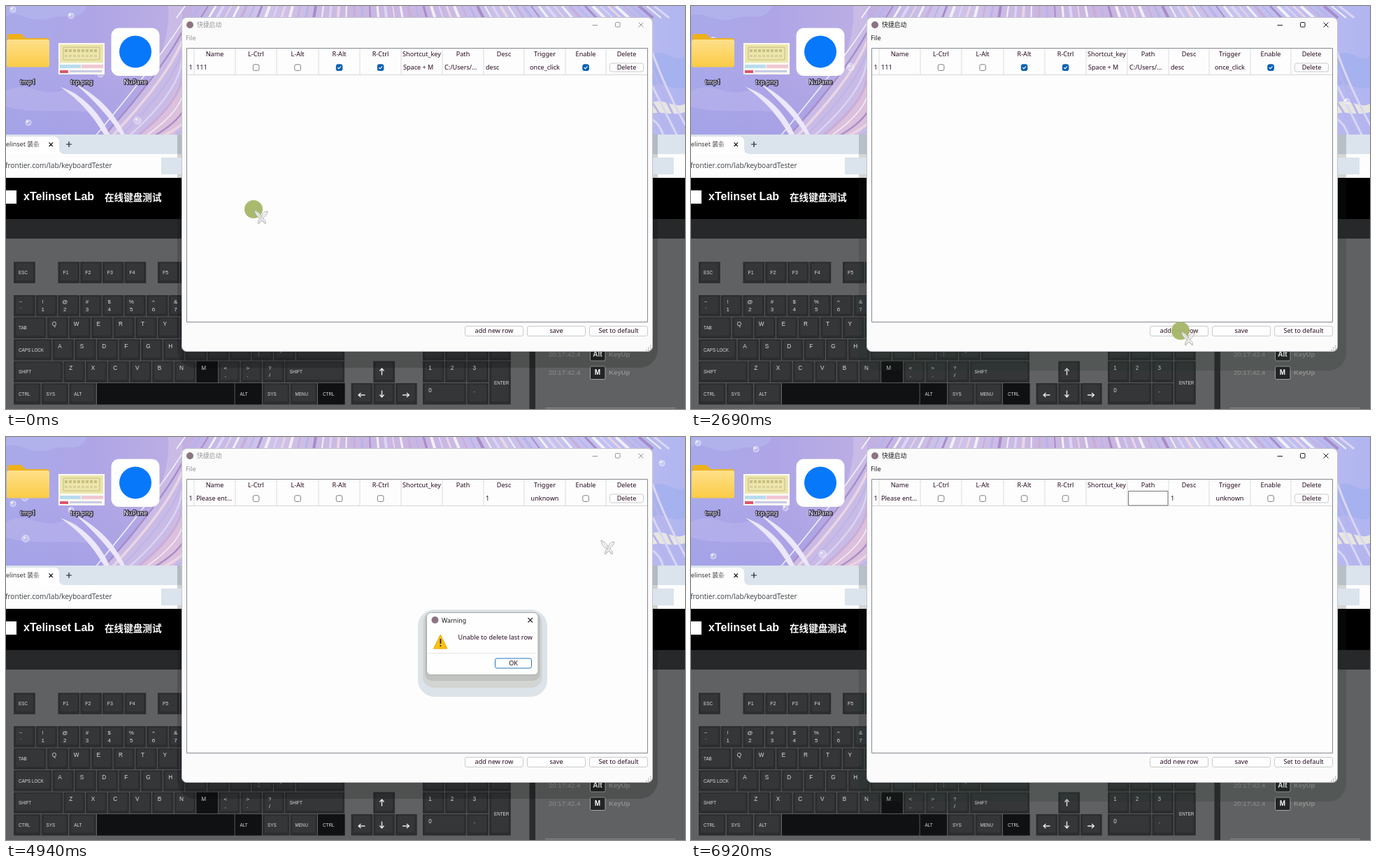
An HTML page with a canvas for the animation above (7.01 s loop, 971x577 px).

```html
<!DOCTYPE html>
<html lang="zh">
<head>
<meta charset="utf-8">
<title>快捷启动</title>
<style>
html, body { margin: 0; width: 100%; height: 100%; overflow: hidden; background: #5f6061; }
canvas { display: block; }
</style>
</head>
<body>
<canvas id="stage" width="971" height="577"></canvas>
<script>
const c = document.getElementById('stage').getContext('2d');
const LOOP = 7010, STEP = LOOP / 78;
const UI = '"Noto Sans", "Noto Sans CJK SC", "Noto Sans CJK", sans-serif';
const ARIAL = '"Liberation Sans", "Noto Sans CJK SC", "Noto Sans CJK", sans-serif';
const INK = '#260a20';

// drawing helpers
function rect(x, y, w, h, fill) { c.fillStyle = fill; c.fillRect(x, y, w, h); }

function box(x, y, w, h, r, fill, stroke, line = 1) {
  c.beginPath();
  c.roundRect(x, y, w, h, r);
  if (fill) { c.fillStyle = fill; c.fill(); }
  if (stroke) { c.strokeStyle = stroke; c.lineWidth = line; c.stroke(); }
}

function disc(x, y, r, fill) {
  c.beginPath();
  c.arc(x, y, r, 0, 7);
  c.fillStyle = fill;
  c.fill();
}

function path(d, fill, stroke, line = 1) {
  const p = new Path2D(d);
  if (fill) { c.fillStyle = fill; c.fill(p); }
  if (stroke) { c.strokeStyle = stroke; c.lineWidth = line; c.stroke(p); }
}

function text(s, x, y, size = 9.1, color = INK, align = 'left', font = UI, weight = '') {
  c.font = `${weight} ${size}px ${font}`;
  c.textAlign = align;
  c.textBaseline = 'middle';
  c.fillStyle = color;
  c.fillText(s, x, y);
}

function gradient(x0, y0, x1, y1, ...colors) {
  const g = c.createLinearGradient(x0, y0, x1, y1);
  colors.forEach((color, i) => g.addColorStop(i / (colors.length - 1), color));
  return g;
}

// desktop
const HAIR = ['#f3effb', '#a78cc8', '#ead5e4', '#b9b3ea', '#dcd5f4', '#c7aeda'];

function wallpaper(t) {
  rect(0, 0, 971, 184, gradient(0, 0, 971, 0, '#a8a9ea', '#afa5e6', '#bcaee4', '#cfc4ea',
    '#cab8e2', '#c9b6e2', '#c9c3ec', '#c1c0f0', '#b0b5f0'));
  rect(0, 90, 252, 94, gradient(0, 90, 0, 184, '#a39fe600', '#a39fe6b0'));

  // soft clouds
  path('M0 14C20 6 34 26 62 18S104 24 116 0H0Z', '#b6b8f0a0');
  path('M0 122C30 106 48 130 76 122S108 136 116 152C80 146 44 156 0 144Z', '#b9b5eea0');
  path('M924 70C944 58 956 84 971 72V116C950 124 940 104 924 116Z', '#9fb0efa0');
  path('M924 138C944 132 956 148 971 140V152C950 158 940 150 924 154Z', '#e6e6e0');

  // hair sweeping down from behind the window
  path('M232 0C236 50 212 120 140 184H252V0Z', '#c9bbe6');
  path('M252 100C238 138 216 162 194 184H240L252 164Z', '#dcc0dc');
  for (let i = 0; i < 11; i++) {
    const x = 128 + i * 12, y = 24 + i * 13;
    path(`M252 ${y}Q${x + 84 - i * 3} ${y + 62 - i * 4} ${x} 186`, null, HAIR[i % 6], 1.5 + i % 3);
  }
  path('M78 116C108 126 134 152 148 184H140C124 156 104 134 78 116ZM100 112C134 130 156 154 170 184H164C146 156 124 134 100 112Z',
    '#ece7f9');
  for (let i = 0; i < 5; i++)
    path(`M924 ${66 + i * 24}Q${944 - i * 2} ${122 + i * 12} ${980 - i * 10} 186`, null, HAIR[i % 2 ? 3 : 4], 3);

  // locks above the window
  for (let i = 0; i < 62; i++) {
    const x = 256 + i * 11, lean = (x - 500) * .05;
    path(`M${x} 0L${x + lean} 17`, null, HAIR[i * 5 % 7 % 6], 2 + i % 3);
  }

  // rising bubbles
  [[10, 5], [28, 55], [135, 98], [188, 164], [32, 167], [228, 206], [938, 255], [27, 304], [93, 14]]
    .forEach(([x, y0], i) => {
      const y = (y0 - t * .044 + 308) % 308;
      if (y > 180) return;
      disc(x, y, 4 + i % 2, '#ffffff40');
      c.strokeStyle = '#ffffff90';
      c.lineWidth = 1;
      c.stroke();
      disc(x - 1.5, y - 1.5, 1.3, '#fff');
    });
}

function label(s, x, y) {
  c.font = `9px ${UI}`;
  c.textAlign = 'center';
  c.textBaseline = 'middle';
  c.lineJoin = 'round';
  c.lineWidth = 2.4;
  c.strokeStyle = '#151020c0';
  c.strokeText(s, x + .5, y + .5);
  text(s, x, y, 9, '#fff', 'center');
}

function icons() {
  path('M2 44Q2 40 6 40H22L28 46H58Q62 46 62 50V60H2Z', '#eeb11d');
  box(1, 48, 61, 39.5, 3, gradient(0, 48, 0, 88, '#ffe08a', '#fbcb45'));

  rect(75, 53, 66, 45, '#fbfaf2');
  rect(77, 55, 62, 26, '#ece6ad');
  box(82, 59, 52, 18, 1, null, '#b5ab70', .7);
  for (let i = 0; i < 8; i++) {
    rect(84 + i * 6, 62, 4, 4, '#c9bf81');
    rect(84 + i * 6, 70, 4, 3, '#d8d097');
  }
  rect(77, 84, 30, 5, '#b9dcef');
  rect(108, 84, 31, 5, '#f1c7d3');
  rect(77, 92, 12, 4, '#e0546c');
  rect(91, 92, 46, 3, '#c8cbe6');

  box(150.5, 31.5, 69, 68.5, 11, '#fff');
  disc(185, 65.5, 23, '#0878fb');

  label('tmp1', 31, 109);
  label('tcp.png', 108, 109);
  label('NuPane', 185, 109);
}

// browser
function key(x, y, w, name = '', dark = false, h = 30.6) {
  rect(x, y, w, h, dark ? '#101112' : '#2b2d2f');
  if (!dark) box(x + 3, y + 2, w - 6, h - 6, 2, '#343638');
  const color = '#dcdcdc';
  if (name.length > 2 || /^F\d/.test(name))
    text(name, x + 7, y + h / 2 + .5, name[0] === 'F' ? 7 : 6.3, color, 'left', ARIAL);
  else if (name.length === 2) {
    text(name[0], x + 10, y + 10, 8, color, 'center', ARIAL);
    text(name[1], x + 10, y + 20.5, 8, color, 'center', ARIAL);
  } else text(name, x + 10.5, y + 10.5, 8.2, color, 'center', ARIAL);
}

function arrow(x, y, angle) {
  c.save();
  c.translate(x, y);
  c.rotate(angle);
  path('M-5 0H4M1 -3L4.5 0L1 3', null, '#e8e8e8', 1.4);
  c.restore();
}

function keyboard() {
  const pitch = 31.65, w = 30.8;
  const row = (x, y, names) => names.forEach((s, i) => key(x + i * pitch, y, w, s, s === 'M'));
  key(11, 366.3, w, 'ESC');
  row(74.5, 366.3, ['F1', 'F2', 'F3', 'F4']);
  row(217, 366.3, ['F5', 'F6']);
  row(11, 414, ['~`', '!1', '@2', '#3', '$4', '%5', '^6', '&7']);
  key(11, 445.5, 46.5, 'TAB');
  row(58.5, 445.5, [...'QWERTYU']);
  key(11, 477, 54.5, 'CAPS LOCK');
  row(66.4, 477, [...'ASDFGHJKL', ':;', '"\'']);
  key(414.6, 477, 69.5, 'ENTER');
  key(11, 508.5, 70.5, 'SHIFT');
  row(82.3, 508.5, [...'ZXCVBNM', '<,', '>.', '?/']);
  key(398.6, 508.5, 85.5, 'SHIFT');
  [[11, 'CTRL'], [50.6, 'SYS'], [90.2, 'ALT'], [327.5, 'ALT', 1], [367, 'SYS'], [406.4, 'MENU'], [446, 'CTRL', 1]]
    .forEach(([x, s, dark]) => key(x, 540, 38.6, s, dark));
  key(130, 540, 196.6, '', true);

  key(525.3, 508.5, w);
  row(493.6, 540, ['', '', '']);
  arrow(537.5, 523.5, -Math.PI / 2);
  arrow(508.5, 557, Math.PI);
  arrow(537.5, 555.5, Math.PI / 2);
  arrow(572, 557, 0);

  row(596, 477, ['4', '5', '6', '+']);
  row(596, 508.5, ['1', '2', '3']);
  key(596, 540, 62.4, '0');
  key(659.3, 540, w, '.');
  key(691, 508.5, w, 'ENTER', false, 62);
}

function browser() {
  rect(0, 184, 971, 28, '#dbe3ec');
  path('M0 187H69Q76 187 76 195V204Q76 212 84 212H0Z', '#fff');
  text('elinset 装备', 0, 198.5, 9, '#333');
  rect(36, 190, 18, 18, gradient(36, 0, 54, 0, '#ffffff00', '#fff'));
  path('M61.5 195.5L67 201M67 195.5L61.5 201M86 198H94M90 194V202', null, '#222', 1.2);
  rect(0, 212, 971, 34, '#fdfdfe');
  text('frontier.com/lab/keyboardTester', -1, 229, 10.1, '#3c4043', 'left', '"Open Sans", sans-serif');

  rect(0, 246, 971, 59, '#000');
  rect(0, 264, 15, 19, '#fff');
  text('xTelinset Lab', 25, 274, 16, '#fff', 'left', ARIAL, 'bold');
  text('在线键盘测试', 141, 275, 13.6, '#fff', 'left', ARIAL, 'bold');
  rect(0, 305, 971, 28, '#27282a');
  rect(0, 333, 971, 244, '#606162');
  keyboard();

  rect(748.5, 333, 8.5, 244, '#2a2b2d');
  [['Alt', 498.5], ['M', 525]].forEach(([name, y]) => {
    text('20:17:42.4', 776, y + .5, 9.6, '#8e8e8e', 'left', ARIAL);
    box(835.5, y - 9, 21.5, 18.5, 2, '#232426', '#a8a8a8');
    text(name, 846, y + .5, 10, '#fff', 'center', ARIAL, 'bold');
    text('KeyUp', 862, y + .5, 9.6, '#919191', 'left', ARIAL, 'bold');
  });
  rect(771, 575, 186, 1, '#8f8f8f');
}

// launcher window
const EDGES = [269, 328, 387, 447, 506, 565, 624, 683, 741, 800, 858, 917];
const HEADS = ['Name', 'L-Ctrl', 'L-Alt', 'R-Alt', 'R-Ctrl', 'Shortcut_key', 'Path', 'Desc', 'Trigger', 'Enable', 'Delete'];
const CHECKS = [1, 2, 3, 4, 9];
const FIRST = { name: '111', on: [3, 4, 9], keys: 'Space + M', path: 'C:/Users/...', desc: 'desc', trigger: 'once_click' };
const BLANK = { name: 'Please ent...', on: [], keys: '', path: '', desc: '1', trigger: 'unknown' };
const mid = i => (EDGES[i] + EDGES[i + 1]) / 2;

function button(name, x, y, w, h, edge = '#cbcbcb') {
  box(x + .5, y + .5, w - 1, h - 1, 2.5, '#fefefe', edge);
  text(name, x + w / 2, y + h / 2, 9.1, INK, 'center');
}

function check(x, y, on) {
  box(x - 4.2, y - 4.2, 8.6, 8.6, 2, on ? '#0a5fb2' : '#fff', on ? '#0a5fb2' : '#7c7c7c');
  if (on) path(`M${x - 2.2} ${y}l1.7 1.8l3 -3.4`, null, '#fff', 1.1);
}

function tableRow(row, n) {
  const y = 88 + n * 21.5, bottom = 98.5 + n * 22, top = n ? 98 : 61;
  text(n + 1, 264, y + .5, 9, INK, 'center');
  EDGES.slice(0, -1).forEach(x => rect(x - .5, top, 1, bottom - top, '#dcdcdc'));
  rect(259, bottom - .5, 658, 1, '#d6d6d6');
  text(row.name, 272, y);
  CHECKS.forEach(i => check(mid(i), y, row.on.includes(i)));
  text(row.keys, 568, y);
  text(row.path, 627, y);
  text(row.desc, 686, y);
  text(row.trigger, mid(8), y, 9.1, INK, 'center');
  button('Delete', 863, y - 6.5, 49, 13);
}

function launcher(rows, active, focused) {
  const spread = active ? 12 : 7;
  box(252 - spread, 184, 673 + spread * 2, 334 + (active ? 4 : 0), [0, 0, 26, 26], active ? '#1e2a2430' : '#0000002e');
  rect(active ? 220 : 222, 217, 32, 24, '#dbe3ec');
  rect(925, 217, active ? 31 : 30, 24, '#dbe3ec');

  box(251.5, 16.5, 673, 478, 7, '#fbfbfc', '#c4c4cc');
  const tint = active ? '#1c1c1c' : '#969696';
  disc(263, 27, 5, '#8d7480');
  text('快捷启动', 273, 27, 8.8, tint);
  text('File', 257, 46, 9.1, tint);
  path('M838.5 27.5H846M904.5 23.5L911.5 30.5M911.5 23.5L904.5 30.5', null, tint);
  box(871.5, 23.5, 6.5, 6.5, 1, null, tint);

  rect(258.5, 60.5, 659, 392, '#fdfdfd');
  HEADS.forEach((s, i) => text(s, mid(i), 69, 9.1, INK, 'center'));
  rows.forEach(tableRow);
  if (focused) box(625.5, 77.5, 56.5, 20.5, 0, null, '#777');
  box(258.5, 60.5, 659, 392, 0, null, '#858890');

  button('add new row', 656, 458, 84, 15);
  button('save', 745, 458, 84, 15);
  button('Set to default', 834, 458, 84, 15);
  [[921, 487], [921, 490], [918, 490], [921, 493], [918, 493], [915, 493]]
    .forEach(([x, y]) => rect(x, y - 1, 1.4, 1.4, '#999'));
}

function warning() {
  box(589, 247, 185, 125, 24, '#dce4ea');
  box(596, 250, 171, 109, 16, '#d2d5d2');
  box(599, 251, 165, 98, 10, '#bfc2bf');
  box(601.5, 251.5, 159.5, 89, 6, '#fefefe', '#a9adad');
  disc(613.5, 262, 5, '#8d7480');
  text('Warning', 623, 263, 8.8, '#151515');
  path('M746.5 259L753 265.5M753 259L746.5 265.5', null, '#222', 1.1);
  path('M621.3 283L631 303H611.5Z', '#fcc30b', '#e8a800');
  rect(620.5, 289, 1.8, 7, '#222');
  rect(620.5, 298, 1.8, 2, '#222');
  text('Unable to delete last row', 646.5, 287.5);
  rect(602, 309, 159, 1, '#e6e6e6');
  button('OK', 699, 316.5, 53, 15, '#2674bd');
}

// pointer: [ms, x, y]
const ROUTE = [
  [0, 354, 291], [180, 380, 283], [540, 640, 200], [900, 890, 95], [1010, 906, 87], [1260, 906, 87],
  [1700, 750, 270], [1850, 718, 314], [2080, 718, 314], [2500, 702, 450], [2620, 700, 465],
  [2960, 700, 465], [3300, 790, 270], [3500, 827, 216], [3860, 892, 98], [4040, 897, 83], [4850, 897, 83],
  [5150, 745, 290], [5250, 723, 320], [5600, 723, 320], [6300, 1010, 250], [LOOP, 1010, 250]
];
const CLICKS = [1170, 1990, 2700, 4400, 4760, 5315];

function pointAt(t) {
  const i = Math.max(1, ROUTE.findIndex(p => p[0] >= t));
  const [a, x0, y0] = ROUTE[i - 1], [b, x1, y1] = ROUTE[i];
  const k = Math.max(0, (t - a) / (b - a));
  return [x0 + (x1 - x0) * k, y0 + (y1 - y0) * k];
}

function pointer(t) {
  const [x, y] = pointAt(t), [hx, hy] = pointAt(t - 60);
  const since = Math.min(...CLICKS.map(k => t - k).filter(d => d >= 0));
  const fading = since < 230;
  c.globalAlpha = fading ? Math.max(0, .95 - since * .0055) : .97;
  disc(hx, hy, fading ? 13 + since * .04 : 13, '#a6b86a');
  c.globalAlpha = 1;
  c.save();
  c.translate(x, y);
  path('M1 1C7 3 10 7 11 11C13 5 16 3 20 3C19 8 16 11 13 13C17 15 18 18 17 21L12 16L7 21C6 17 8 14 10 13C5 11 2 7 1 1Z',
    '#fbfbfbd0', '#9a9a9a', .8);
  path('M3 3L11 13L17 6M11 13L8 19M12 14L16 19', null, '#b7b7b7', .7);
  c.restore();
}

function draw(now) {
  const t = Math.floor((now % LOOP + 10) / STEP) * STEP % LOOP;
  const dialog = t > 1250 && t < 2060 || t > 4840 && t < 5560;
  const active = t > 2060 && t < 4840 || t > 5560;
  const rows = t < 2780 ? [FIRST] : t < 4390 ? [FIRST, BLANK] : [BLANK];
  c.clearRect(0, 0, 971, 577);
  wallpaper(t);
  icons();
  browser();
  launcher(rows, active, active && t > 4390);
  if (dialog) warning();
  pointer(t);
  requestAnimationFrame(draw);
}

requestAnimationFrame(draw);
</script>
</body>
</html>
```
